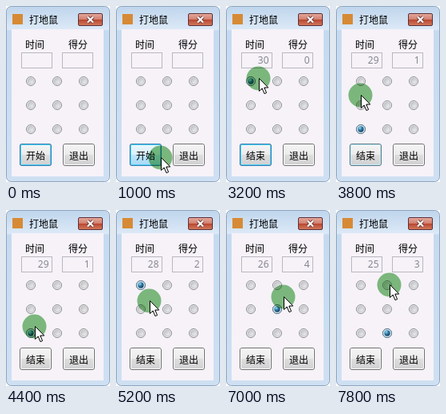
Recreate the animation shown at these times as an HTML page. Size 130 by 220 pixels, loop 8 s.

```html
<!DOCTYPE html>
<html lang="zh-CN">
<head>
<meta charset="utf-8">
<style>
  html, body { margin: 0; width: 100%; height: 100%; overflow: hidden; background: #fff; }
  svg { display: block; width: 130px; height: 220px; }
  text { font: 12px "Noto Sans CJK SC", "Noto Sans CJK", sans-serif; fill: #000; }
  .value { font: 12px "Open Sans", sans-serif; fill: #7f808a; text-anchor: end; }
  .middle { text-anchor: middle; }
</style>
</head>
<body>
<svg viewBox="0 0 130 220">
  <defs>
    <linearGradient id="glass" x2="0" y2="1">
      <stop stop-color="#bfd5ec"/><stop offset=".13" stop-color="#dce9f7"/>
      <stop offset=".14" stop-color="#c5daf0"/><stop offset="1" stop-color="#cfe0f3"/>
    </linearGradient>
    <linearGradient id="close" x2="0" y2="1">
      <stop stop-color="#e5aa9d"/><stop offset=".48" stop-color="#d2806f"/>
      <stop offset=".5" stop-color="#b9442f"/><stop offset="1" stop-color="#d27c5e"/>
    </linearGradient>
    <linearGradient id="face" x2="0" y2="1">
      <stop stop-color="#f5f5f5"/><stop offset=".49" stop-color="#ebebeb"/>
      <stop offset=".5" stop-color="#dedede"/><stop offset="1" stop-color="#d0d0d2"/>
    </linearGradient>
    <linearGradient id="hotFace" x2="0" y2="1">
      <stop stop-color="#eaf6fd"/><stop offset=".49" stop-color="#d9f0fc"/>
      <stop offset=".5" stop-color="#bee6fd"/><stop offset="1" stop-color="#a7d9f5"/>
    </linearGradient>
    <linearGradient id="bowl" x2="1" y2="1">
      <stop stop-color="#bbbcc0"/><stop offset="1" stop-color="#f7f7f8"/>
    </linearGradient>
    <radialGradient id="bead" cx=".35" cy=".3" r=".75">
      <stop stop-color="#9fdcf2"/><stop offset=".45" stop-color="#2c7ba8"/><stop offset="1" stop-color="#123c5c"/>
    </radialGradient>
    <g id="button">
      <rect x=".5" y=".5" width="39" height="27" rx="2.5" fill="url(#face)" stroke="#707070"/>
      <rect x="1.5" y="1.5" width="37" height="25" rx="1.5" fill="none" stroke="#fcfcfc"/>
    </g>
  </defs>

  <rect x=".5" y=".5" width="129" height="219" rx="6" fill="url(#glass)" stroke="#8fa6bf"/>
  <rect x="7" y="29" width="115" height="184" fill="#f6f2f8"/>
  <rect x="8" y="10" width="13" height="13" fill="#d78a35"/>
  <text x="29" y="21.5">打地鼠</text>
  <rect x="90.5" y="9.5" width="30" height="15" rx="1.5" fill="url(#close)" stroke="#5b3038"/>
  <g fill="none">
    <path d="M102 13.5l7 7m0-7l-7 7" stroke="#713b36" stroke-width="4"/>
    <path d="M102 13.5l7 7m0-7l-7 7" stroke="#fff" stroke-width="2.2"/>
  </g>

  <text x="24" y="53">时间</text>
  <text x="78" y="53">得分</text>
  <g fill="#f6f2f8" stroke="#b9b8bf">
    <rect x="19.5" y="58.5" width="38" height="19"/>
    <rect x="70.5" y="58.5" width="38" height="19"/>
  </g>
  <text id="clock" class="value" x="53.5" y="72"></text>
  <text id="score" class="value" x="104.5" y="72"></text>
  <g id="holes"></g>

  <use href="#button" x="17" y="172"/>
  <use href="#button" x="71" y="172"/>
  <rect id="hover" x="18" y="173" width="38" height="26" rx="2" fill="url(#hotFace)"/>
  <g id="focus" fill="none">
    <rect x="17.5" y="172.5" width="39" height="27" rx="2.5" stroke="#3c7fb1"/>
    <rect x="18.5" y="173.5" width="37" height="25" rx="1.5" stroke="#45cdf3"/>
  </g>
  <text id="action" class="middle" x="37" y="192"></text>
  <text class="middle" x="91" y="192">退出</text>

  <g id="pointer">
    <circle cx="-.5" cy=".5" r="15" fill="#80c080" style="mix-blend-mode:multiply"/>
    <path d="M.5 .5V16.5L4.2 13L7 19.6L9.6 18.5L6.8 12H11.8Z" fill="#fff" stroke="#000"/>
  </g>
</svg>
<script>
const LOOP = 8000, STEP = 200;
const START = 1400, MOLE_PERIOD = 1200, MOLES = [1, 7, 1, 5, 8];
const DWELL = 200, BOW = 8;
const byId = id => document.getElementById(id);

// The pointer reaches each stop, clicks after DWELL and moves on.
const stops = [
  { time: 200, x: 70, y: 216 },
  { time: 1200, x: 46, y: 185 },
  { time: 3200, x: 41, y: 90, hole: 1 },
  { time: 4400, x: 36, y: 145, hole: 7 },
  { time: 5600, x: 33, y: 93, hole: 1 },
  { time: 6400, x: 62, y: 120, hole: 5 },
  { time: 7400, x: 67, y: 93, hole: 2 }
];

const clamp = v => Math.max(0, Math.min(1, v));
const moleAt = t => MOLES[Math.floor((t - MOLE_PERIOD) / MOLE_PERIOD) - 1];

// A hit adds a point, a miss takes one away.
function scoreAt(t) {
  return stops.filter(s => s.hole && s.time + DWELL <= t)
    .reduce((sum, s) => sum + (moleAt(s.time + DWELL) === s.hole ? 1 : -1), 0);
}

// Straight travel between stops, bowed towards the right-hand side.
function pointerAt(t) {
  const i = stops.findLastIndex(s => s.time <= t);
  const from = stops[i], to = stops[i + 1] || from;
  const k = clamp((t - from.time - DWELL) / (to.time - from.time - DWELL));
  const dx = to.x - from.x, dy = to.y - from.y;
  const bow = BOW * Math.sin(Math.PI * k) / (Math.hypot(dx, dy) || 1);
  return [from.x + dx * k - dy * bow, from.y + dy * k + dx * bow].map(Math.round);
}

byId('holes').innerHTML = Array.from({ length: 9 }, (_, i) => {
  const x = 31 + i % 3 * 33, y = 94 + Math.floor(i / 3) * 30;
  return `<g transform="translate(${x} ${y})">
    <circle r="5.5" fill="#f4f4f4" stroke="#8b8b90"/>
    <circle r="3.8" fill="url(#bowl)" stroke="#b4b5b9" stroke-width=".7"/>
    <g class="mole"><circle r="5.5" fill="#e3f0f7" stroke="#55748d"/>
    <circle r="3.7" fill="url(#bead)"/></g></g>`;
}).join('');
const beads = document.querySelectorAll('.mole');

const show = (element, visible) => element.style.display = visible ? '' : 'none';

function draw(t) {
  const running = t >= START, entered = t >= stops[0].time;
  byId('clock').textContent = running ? 30 - Math.max(0, Math.floor((t - 2600) / 1000)) : '';
  byId('score').textContent = running ? scoreAt(t) : '';
  byId('action').textContent = running ? '结束' : '开始';
  byId('focus').style.opacity = clamp((4000 - t) / 600);
  beads.forEach((bead, i) => show(bead, i + 1 === moleAt(t)));

  const [x, y] = entered ? pointerAt(t) : [0, 0];
  show(byId('pointer'), entered);
  show(byId('hover'), x < 57 && y > 150);
  byId('pointer').setAttribute('transform', `translate(${x} ${y})`);
}

function tick() {
  const t = performance.now() % LOOP;
  draw(Math.floor(t / STEP) * STEP);
  requestAnimationFrame(tick);
}
tick();
</script>
</body>
</html>
```
